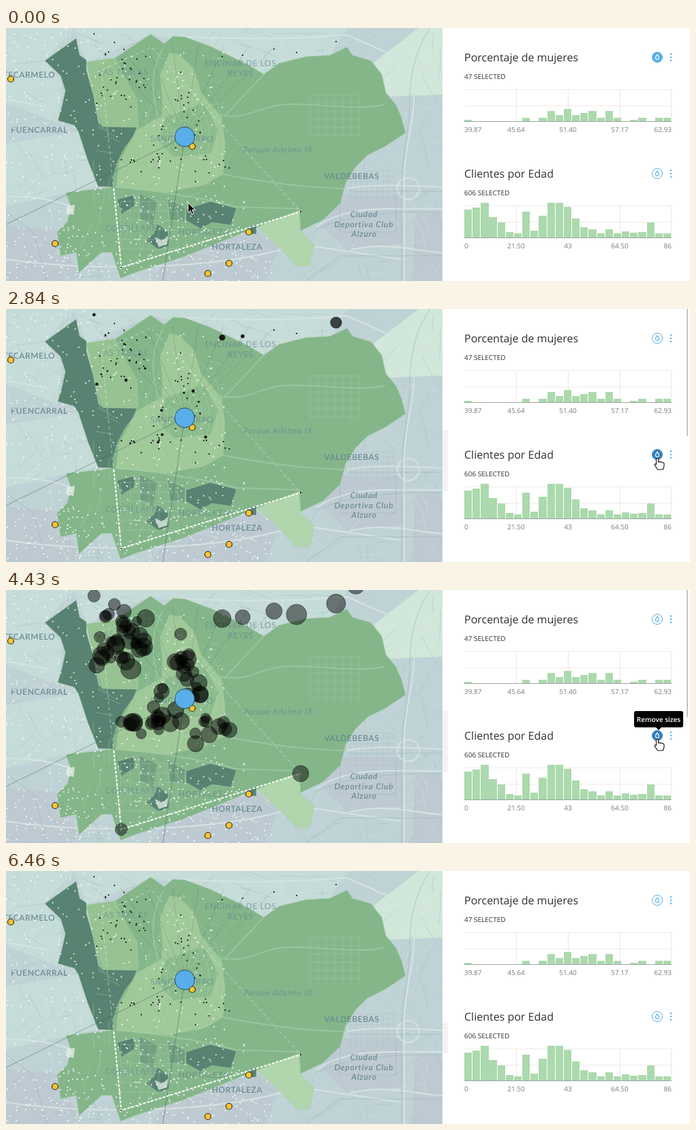
An HTML page that plays this animation: 1003 px wide and 372 px high, repeating every 6.82 s.

```html
<!DOCTYPE html>
<html lang="es">
<head>
<meta charset="utf-8">
<title>Mapa de clientes</title>
<style>
  html, body { margin: 0; width: 100%; height: 100%; overflow: hidden; background: #fff; }
  svg { display: block; width: 1003px; height: 372px; }
  text { font-family: "Open Sans", "Noto Sans", sans-serif; text-rendering: geometricPrecision; }
  .place { font: 500 12px Lato, "Open Sans", sans-serif; letter-spacing: .6px; fill: #66858e; text-anchor: middle; }
  .park { font-style: italic; font-weight: 600; letter-spacing: .8px; }
  .title { font-size: 16px; fill: #2e3036; }
  .count { font-size: 10px; fill: #2e3036; }
  .axis { font-size: 10px; fill: #747d82; }
  .tip { font-size: 10px; font-weight: 600; fill: #fff; text-anchor: middle; }
  .bar { fill: #acd9ad; shape-rendering: crispEdges; }
</style>
</head>
<body>
<svg id="stage" viewBox="0 0 1003 372" xmlns="http://www.w3.org/2000/svg">
  <g>
    <path fill="#bfd2d5" d="M0 0H640V372H0Z"/>
    <path fill="#c6dcd8" d="M0 0H100L57 48 82 80 76 140 0 110ZM100 0H500L475 40 378 68 300 27 212 10 118 50ZM0 170L106 152 135 232 90 242 0 262Z"/>
    <path fill="#d0e7d9" d="M540 50L605 0H640V98L556 101Z"/>
    <path fill="#bdcad1" d="M490 245H580V318L500 326 462 290ZM600 270H640V372H596ZM0 290L75 298 107 360 98 372H0ZM225 350L365 295 400 322 380 372H222Z"/>
  </g>
  <g id="roads" fill="none"></g>
  <g fill="none" stroke="#d6e3e3" stroke-width="2">
    <path d="M628 0C606 30 596 66 598 100S582 180 584 235V372M500 236Q540 228 640 234M455 292C500 262 540 266 640 266"/>
    <path d="M574 236a16 16 0 1 1 32 0a16 16 0 1 1-32 0M505 326Q545 317 590 324T640 330"/>
    <path d="M0 105L60 116M0 248Q50 246 95 262M0 340Q100 355 225 350T430 318L580 340M250 12Q380 20 500 10L640 72"/>
  </g>
  <path fill="none" stroke="#9eb5be" opacity=".65" d="M622 0C600 32 592 70 592 110S580 190 580 240V372M502 240H640M456 296Q510 268 640 270M0 270L40 300 60 372M440 372L490 335H640M490 245V300H572V246"/>
  <g stroke="#a9cfa9" stroke-width=".5">
    <path fill="#84b68a" d="M118 50L160 44 212 9 232 23 245 12 262 13 300 27 355 54 378 68 400 52 440 42 475 40 500 28 508 40 535 48 551 68 557 95 572 113 580 132 586 154 556 174 530 187 512 205 498 228 490 258 465 282 428 300 368 293 262 336 188 360 168 368 155 330 140 330 107 360 103 330 80 335 75 300 90 285 95 262 88 242 157 234Z"/>
    <path fill="#97c393" d="M118 50L160 44 178 80 192 104 194 147 142 145 128 98Z"/>
    <path fill="#a0c999" d="M240 36L255 40 275 60 286 95 315 130 321 170 318 215 290 231 236 241 162 234 166 198 192 150 228 130 230 104 226 70Z"/>
    <path fill="#8cbc8e" d="M235 130L290 110 312 150 300 185 245 190 222 165Z"/>
    <path fill="#588271" d="M57 48L75 35 103 15 108 40 118 47 118 62 128 98 136 140 142 145 192 146 186 160 174 176 164 196 158 215 157 234 135 233 120 195 106 152 100 143 76 136 82 115 87 92 80 70Z"/>
    <path fill="#588271" d="M163 252L190 245 188 262 169 274ZM264 266L300 255 338 265 330 290 302 286 285 295 264 283ZM222 288L238 300 239 320 224 326 205 312 217 302ZM355 292L367 289V303H357Z"/>
    <path fill="#719f80" d="M195 243L222 255 216 292 196 280ZM236 250L263 264 262 285 240 282Z"/>
    <path fill="#b1d5ad" d="M368 293L430 268 432 300 452 318 445 350 426 350 400 322Z"/>
  </g>
  <path fill="#e8f0ea" opacity=".75" d="M89 262L101 260 99 275 88 272ZM218 307L229 313 238 305 236 318 224 322Z"/>
  <g id="streets" fill="none" stroke="#b3d4b3"></g>
  <path fill="none" stroke="#a8cfaa" stroke-width="2" opacity=".6" d="M315 128C360 136 370 112 420 112S520 122 556 112M318 215Q420 235 500 236M160 234Q260 242 338 263L430 266M320 130L378 68M230 30Q205 75 224 132"/>
  <g id="rays" stroke="#35594f"></g>
  <g id="labels"></g>
  <path id="clients" fill="#fff" opacity=".9"/>
  <g fill="none" stroke="#fff">
    <path d="M158 240L140 62 213 28 432 270" stroke-dasharray="5 4" opacity=".5"/>
    <path d="M158 236L169 352 432 270" stroke-width="2" stroke-dasharray="4 2"/>
  </g>
  <g id="stores" fill="#fbc42d" stroke="#292d2a" stroke-width="1.2"></g>
  <g id="bubbles" stroke="#000" stroke-opacity=".4"></g>
  <circle cx="262" cy="160" r="14.5" fill="#59aee9" stroke="#284d60"/>
  <path fill="#fff" d="M640 0H1003V372H640Z"/>
  <path id="handle" fill="#f3f3f6"/>
  <path id="scrollbar" fill="#c3c3c5" d="M998 0H1000V187H998Z"/>
  <g id="panel"></g>
  <g id="tooltip">
    <rect id="tipBox" y="178" height="24" rx="3"/>
    <path d="M953 202H961L957 206Z"/>
    <text id="tipText" class="tip" x="957" y="194"></text>
  </g>
  <path id="arrow" stroke="#fff" d="M0 0V14.4L3.4 11.4 5.7 16.8 8.2 15.7 5.9 10.4H10.4Z"/>
  <path id="hand" fill="#fff" stroke="#111" stroke-width="1.1" stroke-linejoin="round" d="M-1.5 1.5Q0-.5 1.5 1.5V6Q3.5 4.6 4.5 6.4Q6.4 5.2 7.3 7Q9.8 6.2 10 8.6V12L8.5 17H.6L-3.8 10.6Q-4 8-1.5 9.4Z"/>
</svg>
<script>
const LOOP = 6820, STEP = 87;
const GROW = 2570, SHRINK = 4600, FADE = 500;
const BLUE = '#59aee9', DEEP = '#3580bd';
const $ = id => document.getElementById(id);
const clamp = v => Math.max(0, Math.min(1, v));
const smooth = p => p * p * (3 - 2 * p);
const cubic = p => p < .5 ? 4 * p ** 3 : 1 - 4 * (1 - p) ** 3;

let seed = 71;
function rand(a = 0, b = 1) {
  seed = (seed * 16807) % 2147483647;
  return a + (b - a) * seed / 2147483647;
}
// bell-shaped, from 0 to 3
const bell = () => rand() + rand() + rand();

function add(parent, tag, attrs, text) {
  const el = document.createElementNS('http://www.w3.org/2000/svg', tag);
  for (const key in attrs) el.setAttribute(key, attrs[key]);
  if (text !== undefined) el.textContent = text;
  return parent.appendChild(el);
}

// --- map detail ---
// Short streets that follow a slowly turning direction or cross it.
function streetPath(n, x0, x1, y0, y1, longest) {
  let d = '';
  for (let i = 0; i < n; i++) {
    const x = rand(x0, x1), y = rand(y0, y1), len = rand(8, longest);
    const a = Math.sin(x / 90) + Math.cos(y / 70) + (i % 2) * Math.PI / 2;
    const dx = Math.cos(a) * len, dy = Math.sin(a) * len, bend = rand(-.12, .12);
    d += `M${x.toFixed(1)} ${y.toFixed(1)}q${(dx / 2 - dy * bend).toFixed(1)} ${(dy / 2 + dx * bend).toFixed(1)} ${dx.toFixed(1)} ${dy.toFixed(1)}`;
  }
  return d;
}

function gridPath(x, y, w, h, gap) {
  let d = '';
  for (let i = 0; i <= w; i += gap) d += `M${x + i} ${y}v${h}`;
  for (let j = 0; j <= h; j += gap) d += `M${x} ${y + j}h${w}`;
  return d;
}

function drawStreets() {
  const roads = (d, stroke, opacity) => add($('roads'), 'path', { d, stroke, opacity });
  roads(streetPath(200, -20, 440, 0, 372, 45), '#d6e4e4', .6);
  roads(streetPath(160, -20, 440, 0, 372, 55), '#a5bac2', .45);
  roads(streetPath(60, 440, 640, 0, 372, 60), '#d2e0e2', .6);
  roads(streetPath(40, 440, 640, 0, 372, 60), '#a5bac2', .45);
  roads(gridPath(505, 210, 64, 50, 8), '#b1c3c9', .6);
  const streets = (d, opacity) => add($('streets'), 'path', { d, opacity });
  streets(gridPath(446, 98, 72, 66, 12), .3);
  streets(gridPath(168, 255, 84, 72, 14), .35);
  streets(streetPath(45, 125, 300, 55, 320, 40), .4);
  for (let r = 24; r < 90; r += 16)
    add($('streets'), 'ellipse', { cx: 262, cy: 160, rx: r * .65, ry: r, opacity: .4 });
}

function drawRays() {
  const ray = (x2, y2, opacity) => add($('rays'), 'line', { x1: 262, y1: 160, x2, y2, opacity });
  ray(0, 289, .45);
  ray(230, 372, .45);
  for (let x = 130; x <= 400; x += 38) ray(x, 25, .2);
}

function drawLabels() {
  const place = (text, x, y, opacity = 1, cls = 'place') =>
    add($('labels'), 'text', { x, y, opacity, class: cls }, text);
  place('MONTECARMELO', 18, 73);
  place('FUENCARRAL', 49, 154);
  place('LAS TABLAS', 172, 69, .5);
  place('ENCINAR DE LOS', 344, 56, .65);
  place('REYES', 344, 71, .65);
  place('SANCHINARRO', 258, 167, .65);
  place('VALDEBEBAS', 507, 222);
  place('COSTILLARES', 187, 299, .55);
  place('HORTALEZA', 290, 304, .65);
  place('HORTALEZA', 339, 326);
  place('Parque Adelmo IX', 399, 183, .6, 'place park');
  ['Ciudad', 'Deportiva Club', 'Alzuro'].forEach((line, i) =>
    place(line, 525, 278 + i * 14.7, .9, 'place park'));
}

function drawClients() {
  let d = '';
  const scatter = (n, x, y, w, h) => {
    while (n--) d += `M${rand(x, x + w).toFixed(1)} ${rand(y, y + h).toFixed(1)}h1.8v1.8h-1.8z`;
  };
  scatter(210, 0, 290, 390, 82);
  scatter(90, 160, 245, 190, 70);
  scatter(115, 0, 0, 140, 285);
  scatter(115, 125, 35, 200, 205);
  $('clients').setAttribute('d', d);
}

function drawStores() {
  for (const [cx, cy] of [[7, 75], [72, 317], [273, 174], [356, 300], [327, 346], [296, 361]])
    add($('stores'), 'circle', { cx, cy, r: 4.5 });
}

// --- bubbles, each with its own delays ---
const bubbles = [];
function bubble(cx, cy, full, grow = 20 + 130 * bell(), shrink = 20 + 150 * bell()) {
  bubbles.push({ full, grow, shrink, el: add($('bubbles'), 'circle', { cx, cy }) });
}

function drawBubbles() {
  // centre x, centre y, spread, count
  const clusters = [[152, 24, 22, 5], [180, 50, 20, 10], [145, 92, 16, 9], [186, 86, 22, 12],
    [264, 111, 18, 10], [272, 146, 13, 7], [234, 169, 18, 6], [226, 195, 16, 9], [192, 199, 14, 6], [302, 203, 15, 9]];
  for (const [x, y, spread, n] of clusters)
    for (let i = 0; i < n; i++)
      bubble(x + (bell() - 1.5) * spread * 1.4, y + (bell() - 1.5) * spread * 1.2, rand(7, 13.5));
  // outliers along the edges
  bubble(484, 20, 14, 0, 0);
  bubble(169, 352, 9, 400, 30);
  bubble(432, 270, 12, 200, 350);
  bubble(256, 65, 9, 400, 350);
  bubble(278, 226, 12, 400, 350);
  bubble(183, 116, 15, 200, 350);
  bubble(317, 42, 13, 60, 300);
  bubble(347, 40, 11, 90, 300);
  bubble(393, 31, 12, 200, 350);
  bubble(426, 36, 15, 200, 350);
  bubble(513, -7, 13, 200, 20);
}

// --- side panel ---
function drawWidget(top, title, count, heights, ticks) {
  const g = add($('panel'), 'g', { transform: `translate(672 ${top})` });
  add(g, 'text', { class: 'title', y: 49 }, title);
  add(g, 'text', { class: 'count', y: 75 }, count);
  add(g, 'path', { d: 'M0 90.5H304M0 114.5H304', stroke: '#f2eae8' });
  add(g, 'path', { d: 'M76.5 90V138M152.5 90V138M228.5 90V138M303.5 90V138', stroke: '#ece7e6' });
  heights.forEach((h, i) =>
    h && add(g, 'rect', { class: 'bar', x: i * 12.16, y: 138 - h, width: 11.2, height: h }));
  add(g, 'path', { d: 'M0 137.5H304', stroke: '#9ba5a3' });
  ticks.forEach((tick, i) => add(g, 'text', {
    class: 'axis', x: i * 76, y: 153, 'text-anchor': i == 0 ? 'start' : i == 4 ? 'end' : 'middle'
  }, tick));
  for (const dy of [-4.7, 0, 4.7]) add(g, 'circle', { cx: 303, cy: 43 + dy, r: 1.2, fill: BLUE });
  return {
    ring: add(g, 'circle', { cx: 283, cy: 43, r: 7.5 }),
    drop: add(g, 'path', { d: 'M283 39.2Q280.2 42.7 280.5 44.4A2.55 2.55 0 0 0 285.5 44.4Q285.8 42.7 283 39.2Z', fill: 'none', 'stroke-width': 1.2 })
  };
}

function paintIcon({ ring, drop }, filled, color) {
  ring.setAttribute('fill', filled ? color : '#fff');
  ring.setAttribute('stroke', color);
  drop.setAttribute('stroke', filled ? '#fff' : color);
}

drawStreets();
drawRays();
drawLabels();
drawClients();
drawStores();
drawBubbles();
const women = drawWidget(0, 'Porcentaje de mujeres', '47 SELECTED',
  [3, 0, 0, 0, 0, 0, 0, 6, 0, 6, 16, 10, 19, 10, 13, 16, 6, 16, 6, 0, 3, 6, 0, 6, 6],
  ['39.87', '45.64', '51.40', '57.17', '62.93']);
const ages = drawWidget(171, 'Clientes por Edad', '606 SELECTED',
  [42, 45, 52, 31, 23, 9, 7, 39, 11, 33, 52, 52, 46, 29, 16, 13, 7, 13, 7, 10, 8, 9, 23, 7, 7],
  ['0', '21.50', '43', '64.50', '86']);

// --- motion ---
const show = (el, on) => el.setAttribute('visibility', on ? 'visible' : 'hidden');
const steps = (t, start) => t < start ? 0 : Math.floor((t - start) / STEP) + 1;

const PATH = [
  { start: 440, n: 7, from: [267, 257], to: [724, 250] },
  { start: 1510, n: 8, from: [724, 250], to: [955, 219] },
  { start: 6110, n: 5, from: [955, 219], to: [944, 378] }
];

function pointer(t) {
  const { start, n, from, to } = PATH.filter(move => t >= move.start).pop() || PATH[0];
  const p = smooth(clamp(steps(t, start) / n));
  return from.map((v, i) => v + (to[i] - v) * p);
}

function setTooltip(text, half) {
  show($('tooltip'), !!text);
  if (!text) return;
  $('tipText').textContent = text;
  $('tipBox').setAttribute('x', 957 - half);
  $('tipBox').setAttribute('width', half * 2);
}

function render(t) {
  const [x, y] = pointer(t);
  const hover = Math.hypot(x - 955, y - 214) < 10;
  const at = `translate(${x.toFixed(1)} ${y.toFixed(1)})`;
  for (const id of ['arrow', 'hand']) $(id).setAttribute('transform', at);
  show($('arrow'), !hover && t < 6455);
  show($('hand'), hover);

  paintIcon(women, t < GROW, BLUE);
  paintIcon(ages, t >= GROW && t < SHRINK, hover ? DEEP : BLUE);

  if (t >= 2115 && t < GROW) setTooltip('Apply sizes', 31);
  else if (t >= 4430 && t < SHRINK) setTooltip('Remove sizes', 36);
  else setTooltip('');

  show($('handle'), t >= 700);
  $('handle').setAttribute('d', `M640 ${t < SHRINK ? 178 : 222}H648V268H640Z`);
  show($('scrollbar'), t >= 1150 && t < 6370);

  const closing = t >= SHRINK;
  const elapsed = Math.floor((t - (closing ? SHRINK : GROW)) / STEP) * STEP;
  for (const b of bubbles) {
    const p = cubic(clamp((elapsed - (closing ? b.shrink : b.grow)) / FADE));
    const k = closing ? 1 - p : p;
    b.el.setAttribute('r', (1 + (b.full - 1) * k).toFixed(2));
    b.el.setAttribute('fill-opacity', (1 - .52 * k).toFixed(2));
    b.el.setAttribute('stroke-width', k > .05 ? 1 : 0);
  }
}

function tick() {
  render(performance.now() % LOOP);
  requestAnimationFrame(tick);
}
tick();
</script>
</body>
</html>
```
